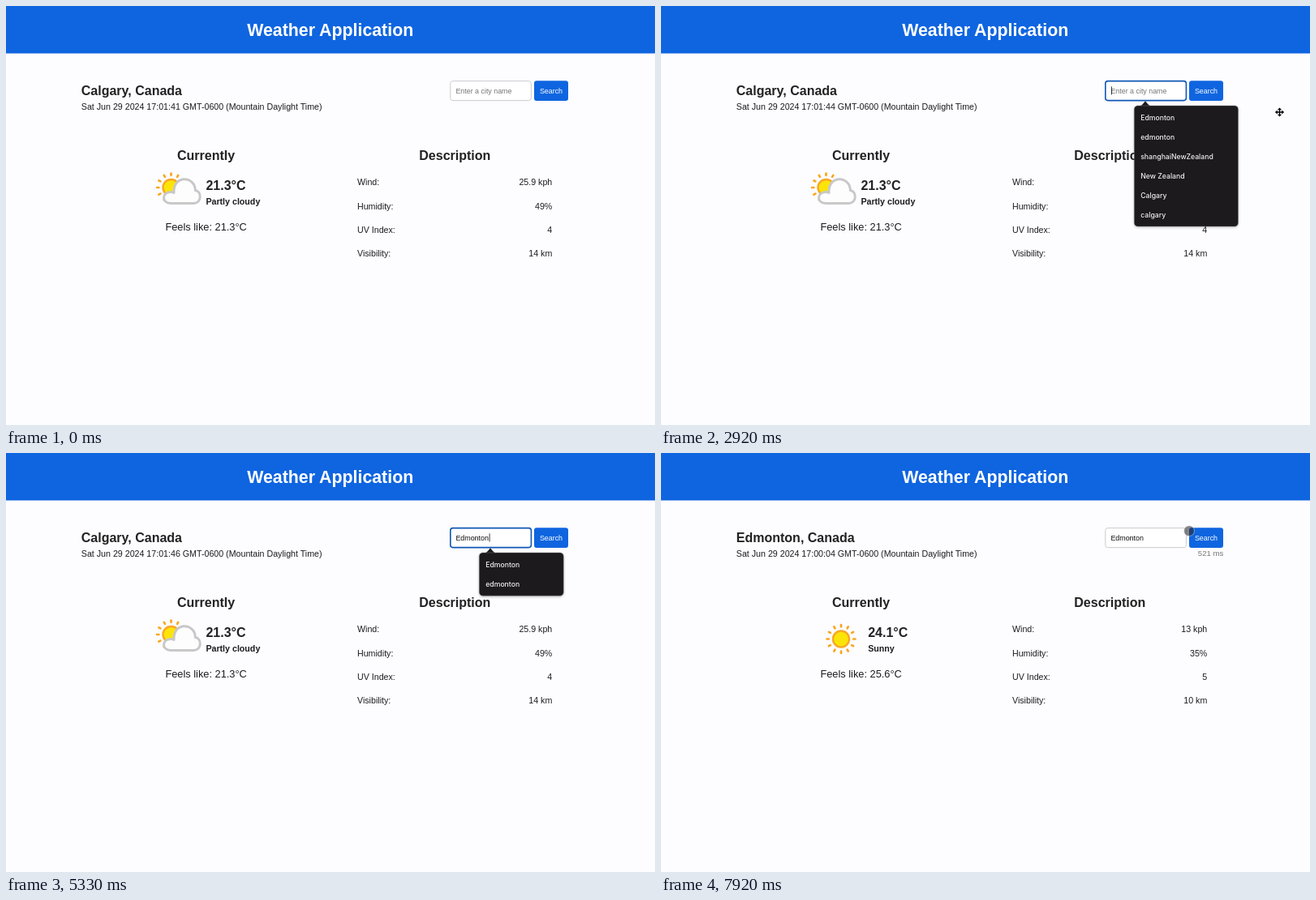
Recreate the animation shown at these times as an HTML page. Size 800 px wide and 517 px high, loop 8 s.

```html
<!DOCTYPE html>
<html lang="en">
<head>
<meta charset="utf-8">
<title>Weather Application</title>
<style>
  html, body { margin: 0; width: 100%; height: 100%; overflow: hidden; background: #fdfcfe; }
  svg { display: block; width: 800px; height: 517px; }
  text { font: 10.667px "Liberation Sans", Arial, sans-serif; fill: #1c1c1e; white-space: pre; }
  .b { font-weight: bold; }
  .h { font-size: 16px; font-weight: bold; fill: #222; }
  .s { font-size: 8.889px; }
  .m { text-anchor: middle; }
  .e { text-anchor: end; }
  #menu text { font: 500 8.7px Inter, sans-serif; fill: #f0eff0; }
</style>
</head>
<body>
<svg viewBox="0 0 800 517">
  <defs>
    <g id="rays" stroke="#faa61c" stroke-width="2.7" stroke-linecap="round"></g>
    <g id="sun">
      <use href="#rays"/>
      <circle r="10" fill="#fde408" stroke="#f9a825" stroke-width="2.4"/>
    </g>
  </defs>
  <rect width="800" height="517" fill="#fdfcfe"/>
  <rect width="800" height="58.5" fill="#0f65e0"/>
  <text class="b m" x="399.7" y="36.9" style="font-size:21.333px;fill:#fff">Weather Application</text>

  <text class="h" id="city" x="92.8" y="109.6"></text>
  <text id="date" x="92.8" y="127.8"></text>

  <rect id="field" x="547.8" y="92.6" width="99.6" height="24" rx="3" fill="#fff"/>
  <text class="s" id="query" x="554.4" y="107.6"></text>
  <rect id="caret" y="99.3" width="0.8" height="10.2" fill="#111"/>
  <rect x="651" y="92.3" width="42" height="24.6" rx="3" fill="#0f65e0"/>
  <text class="s m" x="672" y="107.5" style="fill:#fff">Search</text>
  <text class="e" id="latency" x="693.3" y="127.3" style="font-size:9.6px;fill:#777">521 ms</text>

  <text class="h m" x="246.6" y="189.6">Currently</text>
  <text class="h m" x="553.3" y="189.6">Description</text>

  <g id="cloudy">
    <use href="#sun" x="203.5" y="224"/>
    <path d="M203 243.4C191.5 243.4 191.8 229.6 203 229.6C204.5 229.6 206 229.9 207 230.5C206 207.5 233.5 210 233.3 227.5C241.5 228.5 241.5 243.4 231.5 243.4Z"
      fill="#fdfdfe" stroke="#c8c8c9" stroke-width="3" stroke-linejoin="round"/>
  </g>
  <use id="sunny" href="#sun" x="222" y="229.5"/>
  <text class="h" id="temp" y="227"></text>
  <text class="b" id="sky" y="245.1"></text>
  <text class="m" id="feels" x="246.6" y="276.6" style="font-size:12.8px"></text>
  <g id="rows"></g>

  <g id="menu">
    <path d="M590.5 123.5Q593 122.5 597 117.3Q601 122.5 603.5 123.5Z" fill="#1c1a1c"/>
    <rect id="panel" x="583.3" y="123" rx="4.5" fill="#1c1a1c" stroke="#8a888a" stroke-opacity=".55" stroke-width=".7"
      style="filter:drop-shadow(0 1px 1.5px rgba(0,0,0,.25))"/>
  </g>

  <circle id="dot" r="6.4" fill="#262626" fill-opacity=".56" stroke="#fff" stroke-opacity=".55" stroke-width=".8"/>
  <path id="move" transform="translate(762.5 131)" stroke="#000" stroke-width="1.4"
    d="M-3.5 0H3.5M0-3.5V3.5" />
</svg>
<script>
const $ = id => document.getElementById(id);
const add = (parent, tag, attrs, text = '') => {
  const el = document.createElementNS('http://www.w3.org/2000/svg', tag);
  for (const k in attrs) el.setAttribute(k, attrs[k]);
  el.textContent = text;
  return parent.appendChild(el);
};
const show = (el, on) => el.style.display = on ? '' : 'none';
const set = (el, attrs) => { for (const k in attrs) el.setAttribute(k, attrs[k]); };

const LOOP = 8000, CLICK = 1500, TYPE = 3600, KEY = 135, ENTER = 4920, RESULT = 5440, BLUR = 7200;
const WORD = 'Edmonton';
const reports = [
  { city: 'Calgary, Canada', temp: '21.3°C', sky: 'Partly cloudy', feels: '21.3°C', x: 246.4,
    rows: ['25.9 kph', '49%', '4', '14 km'] },
  { city: 'Edmonton, Canada', temp: '24.1°C', sky: 'Sunny', feels: '25.6°C', x: 255.2,
    rows: ['13 kph', '35%', '5', '10 km'] }
];
// Pointer trips: [start, end, x0, y0, x1, y1]
const trips = [
  [400, 1200, 585, 265, 597, 108.5],
  [1750, 2420, 597, 108.5, 762.5, 131],
  [7250, 7960, 545, 169.5, 652, 95.5]
];

for (let a = 0; a < 360; a += 30)
  add($('rays'), 'path', { d: 'M15.2 0H17.4', transform: `rotate(${a})` });

const arrow = 'M0-5.6L2.6-2.8H-2.6Z';
const arrows = add($('move').parentNode, 'g', { transform: 'translate(762.5 131)' });
for (let a = 0; a < 360; a += 90) add(arrows, 'path', { d: arrow, transform: `rotate(${a})` });

const values = ['Wind:', 'Humidity:', 'UV Index:', 'Visibility:'].map((label, i) => {
  const y = 221.2 + i * 29.35;
  add($('rows'), 'text', { x: 433, y }, label);
  return add($('rows'), 'text', { x: 673.3, y, class: 'e' });
});
const options = ['Edmonton', 'edmonton', 'shanghaiNewZealand', 'New Zealand', 'Calgary', 'calgary']
  .map((name, i) => add($('menu'), 'text', { x: 591.2, y: 141 + i * 24 }, name));

function drawReport(t) {
  const done = t >= RESULT, r = reports[+done];
  const tick = Math.floor((t + 450) / 1000);
  const time = done ? '17:00:0' + (tick - 4) : '17:01:' + (41 + tick);
  $('city').textContent = r.city;
  $('date').textContent = `Sat Jun 29 2024 ${time} GMT-0600 (Mountain Daylight Time)`;
  $('temp').textContent = r.temp;
  $('sky').textContent = r.sky;
  $('feels').textContent = 'Feels like: ' + r.feels;
  set($('temp'), { x: r.x });
  set($('sky'), { x: r.x });
  values.forEach((el, i) => el.textContent = r.rows[i]);
  show($('cloudy'), !done);
  show($('sunny'), done);
  show($('latency'), done);
}

function drawSearch(t) {
  const focus = t >= CLICK && t < BLUR;
  const count = t < TYPE ? 0 : Math.min(WORD.length, 1 + Math.floor((t - TYPE) / KEY));
  const query = $('query');
  query.textContent = WORD.slice(0, count);
  const end = 555.2 + (count ? query.getComputedTextLength() : 0);
  if (!count) query.textContent = 'Enter a city name';
  query.style.fill = count ? '#111' : '#757575';
  set($('field'), { stroke: focus ? '#0f57b5' : '#c6c8cc', 'stroke-width': focus ? 1.6 : 0.9 });

  const typing = t >= TYPE && t < ENTER;
  const blink = Math.floor((t - (t < TYPE ? CLICK : ENTER)) / 500) % 2 === 0;
  set($('caret'), { x: end });
  show($('caret'), focus && (typing || blink));

  const shown = count ? 2 : 6;
  set($('panel'), { width: count ? 104 : 128.2, height: 5 + shown * 24 + (count ? 0.2 : 0) });
  options.forEach((el, i) => show(el, i < shown));
  show($('menu'), focus && t >= CLICK + 80);
}

function drawPointer(t) {
  const trip = trips[t < 1750 ? 0 : t < 6920 ? 1 : 2];
  const [t0, t1, x0, y0, x1, y1] = trip;
  const p = Math.max(0, Math.min(1, (t - t0) / (t1 - t0)));
  const k = p * p * (3 - 2 * p);
  set($('dot'), { cx: x0 + (x1 - x0) * k, cy: y0 + (y1 - y0) * k });
  show($('dot'), (t >= 400 && t < 2650) || t >= 6920);
  const moving = t >= 2650 && t < TYPE;
  show($('move'), moving);
  show(arrows, moving);
}

function frame() {
  const t = performance.now() % LOOP;
  drawReport(t);
  drawSearch(t);
  drawPointer(t);
  requestAnimationFrame(frame);
}
frame();
</script>
</body>
</html>
```
